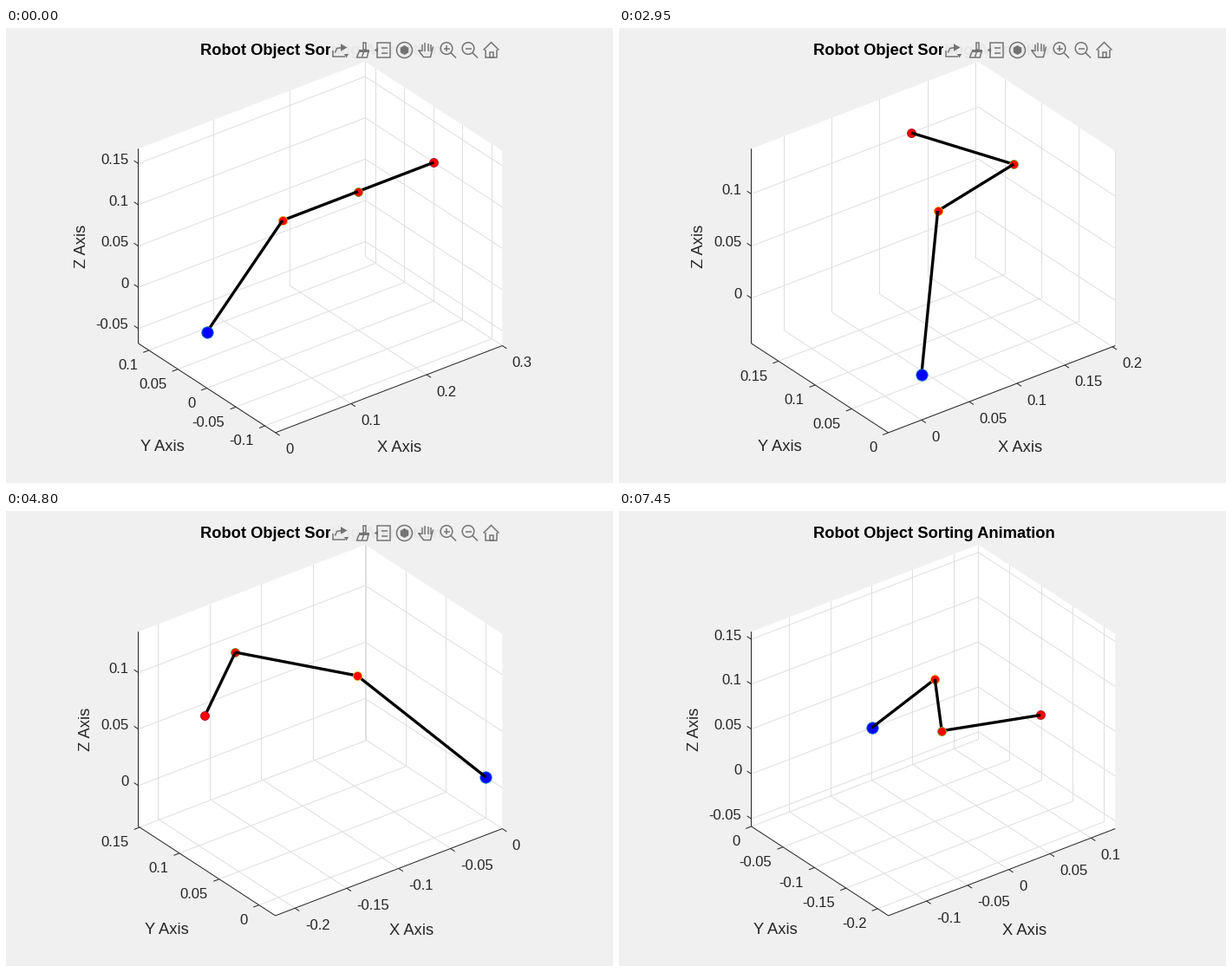
Write a matplotlib script that moves like this. It is 700 px wide and 525 px high and loops after 7500 ms.

```python
import numpy as np
import matplotlib.pyplot as plt
from matplotlib.animation import FuncAnimation
from matplotlib.collections import LineCollection
from matplotlib.patches import Circle, Polygon, Rectangle, RegularPolygon

W, H, DPI = 700, 525, 100
STEPS = 50
INK, GRAY, PAPER = "#262626", "#737373", "#f0f0f0"
plt.rcParams["font.family"] = "Liberation Sans"

# Orthographic view: azimuth -37.5, elevation 30
AZ, EL = np.radians(-37.5), np.radians(30)
UX = np.array([np.cos(AZ), np.sin(AZ) * np.sin(EL)])
UY = np.array([np.sin(AZ), -np.cos(AZ) * np.sin(EL)])
UZ = np.array([0, -np.cos(EL)])
VIEW = np.array([UX, UY, UZ])
TO_EYE = np.array([np.cos(EL) * np.sin(AZ), -np.cos(EL) * np.cos(AZ), np.sin(EL)])
CENTER = np.array([362.5, 252.9])
SIDE = 259.5
ASPECT = np.array([1.271, 1, 1])
TICK = 0.025 * SIDE * ASPECT[0]

# The base joint turns towards each drop point, the others fold the arm
START, PICK, DROP = [np.degrees(np.arctan2(y, x)) for x, y in [(1, 0), (3, 1), (-3, 1)]]
POSES = np.array([[START, 0, 0], [PICK, -31.3, 97.5], [DROP, -31.3, 97.5],
                  [-90, -33.7, 103.9]])

fig = plt.figure(figsize=(W / DPI, H / DPI), dpi=DPI, facecolor=PAPER)
ax = fig.add_axes([0, 0, 1, 1])
ax.set_xlim(0, W)
ax.set_ylim(H, 0)
ax.axis("off")


def px(width):
    return width * 72 / DPI


def project(p, mid=0, scale=SIDE):
    return CENTER + (np.asarray(p) - mid) * scale @ VIEW


def crisp(line):
    """Put vertical lines on whole pixel columns."""
    line = np.array(line)
    if np.ptp(line[:, 0]) < 0.01:
        line[:, 0] = np.floor(line[:, 0]) + 0.5
    return line


def arm(n):
    seg, k = divmod(n, STEPS)
    q = POSES[seg] + (POSES[seg + 1] - POSES[seg]) * k / (STEPS - 1)
    turn = np.radians(np.cumsum(q))
    links = 0.1 * np.column_stack([np.cos(turn), np.sin(turn), [1, 0, 0]])
    return np.vstack([np.zeros(3), np.cumsum(links, axis=0)])


def ticks(lo, hi):
    step = 0.1 if hi - lo > 0.285 else 0.05
    return step * np.arange(np.ceil(lo / step - 1e-6), np.floor(hi / step + 1e-6) + 1)


def label(v):
    return f"{round(v, 2) + 0:g}"


def text_width(s):
    em = {".": 0.278, "-": 0.333}
    return 16.67 * sum(em.get(c, 0.556) for c in s)


def write(x, y, s, size=18.33, **kw):
    kw = {"color": INK, "va": "baseline", "ha": "center", "zorder": 3, **kw}
    return ax.text(x, y, s, fontsize=px(size), **kw)


def lines(color, width, z):
    return ax.add_collection(LineCollection([], colors=color, linewidths=px(width),
                                            snap=False, zorder=z))


# Axes box
left, front, right, right_top, back_top, left_top = [
    project(np.array(c) * ASPECT / 2) for c in
    [(-1, 1, -1), (-1, -1, -1), (1, -1, -1), (1, -1, 1), (1, 1, 1), (-1, 1, 1)]]
ax.add_patch(Polygon([left, front, right, right_top, back_top, left_top],
                     fc="white", ec="none", zorder=0))
lines(INK, 1, 2).set_segments([crisp(e) for e in
                               [(left_top, left), (left, front), (front, right)]])
write(363, 31, "Robot Object Sorting Animation", color="black", weight="bold")

# Parts updated in place
grid, marks = lines("#dfdfdf", 1, 1), lines(INK, 1, 2)
x_name = write(0, 489, "X Axis")
y_name = write(0, 488, "Y Axis")
z_name = write(0, 252, "Z Axis", rotation=90, rotation_mode="anchor")
tick_text = [write(0, 0, "", size=16.67) for _ in range(24)]
links = [ax.plot([], [], color="black", lw=px(3.33), solid_capstyle="butt")[0]
         for _ in range(3)]
joints = [ax.plot([], [], "o", ms=px(10 if i else 13.3), mfc="red" if i else "blue",
                  mec=c, mew=px(0.85))[0]
          for i, c in enumerate(["#0072bd", "#edb120", "#77ac30", "#a2142f"])]

# Toolbar: eight line icons at an even pitch
shade = ax.add_patch(Rectangle((373.5, 13), 199, 24, fc=PAPER, ec="none", zorder=20))
toolbar = []


def show(patch, fill=False):
    patch.set(facecolor=GRAY if fill else "none", edgecolor=GRAY,
              linewidth=0 if fill else px(1.5), zorder=21)
    toolbar.append(ax.add_patch(patch))


def box(x, y, w, h):
    show(Rectangle((x - w / 2, y - h / 2), w, h))


def stroke(*pts):
    show(Polygon(pts, closed=False))


def dash(x, y, w=7):
    stroke((x - w / 2, y), (x + w / 2, y))


def triangle(x, y, r, turn):
    show(RegularPolygon((x, y), 3, radius=r, orientation=turn), fill=True)


def magnifier(x, y):
    show(Circle((x - 1.5, y - 2), 6.8))
    stroke((x + 3.5, y + 3), (x + 9.5, y + 9))
    dash(x - 1.5, y - 2)


def build_toolbar(y=25.5):
    share, brush, tip, cube, hand, zoom_in, zoom_out, home = 384.5 + 25 * np.arange(8)

    stroke((share - 8, y), (share - 8, y + 7), (share + 6, y + 7))
    stroke((share - 5, y + 3), (share - 3, y - 2), (share + 3, y - 3))
    triangle(share + 4, y - 3, 5, -np.pi / 2)
    triangle(share + 8, y + 6, 3, 0)

    box(brush + 4, y - 5, 3, 8)
    show(Rectangle((brush - 3, y - 1), 12, 3), fill=True)
    for dx in (-6, 0, 6):
        stroke((brush + 3 + dx * 0.9, y + 2), (brush + 1 + dx, y + 8))
    dash(brush + 1, y + 8, 13)

    box(tip + 1, y, 15, 17)
    for dy in (-3, 3):
        dash(tip + 2, y + dy)
    triangle(tip - 7, y, 3, np.pi / 2)

    show(Circle((cube, y), 9))
    show(RegularPolygon((cube, y), 6, radius=5.5), fill=True)

    fingers = hand + np.array([-5, -1.5, 2, 5.5])
    for x, top in zip(fingers, 9 - np.abs(fingers - hand) / 2):
        stroke((x, y + 1), (x, y - top))
    stroke((hand - 5, y + 1), (hand - 9, y), (hand - 3, y + 8),
           (hand + 5, y + 8), (hand + 8, y - 4))

    for x in (zoom_in, zoom_out):
        magnifier(x, y)
    stroke((zoom_in - 1.5, y - 5.5), (zoom_in - 1.5, y + 1.5))

    stroke((home - 9, y), (home, y - 9), (home + 9, y))
    stroke(*[(home + sx * 6.5, y + dy) for sx, dy in [(-1, -1), (-1, 8), (1, 8), (1, -1)]])
    box(home, y + 5, 4, 6)


build_toolbar()

# Per axis: order in which grid lines cross the floor and walls,
# tick direction, label offset and alignment
RULES = [((1, 2), -UY, (11.5, 24.5), "left"),
         ((0, 2), -UX, (-12.8, 22.3), "right"),
         ((0, 1), UY, (-11.5, 0.5), "right")]


def place_ticks(lo, hi, mid, scale):
    grid_lines, mark_lines, labels, widest = [], [], [], []
    for axis, (order, out, offset, ha) in enumerate(RULES):
        values = ticks(lo[axis], hi[axis])
        for v in values:
            p = lo.copy()
            if axis == 2:
                p[1] = hi[1]
            p[axis] = v
            path = [project(p, mid, scale)]
            for k in order:
                p[k] = lo[k] + hi[k] - p[k]
                path.append(project(p, mid, scale))
            grid_lines += [crisp(path[:2]), crisp(path[1:])]
            mark_lines.append([path[0], path[0] + TICK * out])
            labels.append((path[0] + offset, label(v), ha))
        widest.append(max(text_width(label(v)) for v in values))

    grid.set_segments(grid_lines)
    marks.set_segments(mark_lines)
    for t in tick_text:
        t.set_visible(False)
    for t, (at, s, ha) in zip(tick_text, labels):
        t.set(position=at, text=s, ha=ha, visible=True)

    # Axis names keep clear of the widest tick label
    x_name.set_x(430 + widest[0])
    y_name.set_x(218 - widest[1])
    z_name.set_x(129.5 - widest[2])


def update(n):
    pts = arm(n)
    low, high = pts.min(axis=0), pts.max(axis=0)
    mid = (low + high) / 2
    # Equal axes: the tightest box of fixed shape around the arm
    size = np.max((high - low) / ASPECT)
    scale = SIDE / size
    half = size * ASPECT / 2
    place_ticks(mid - half, mid + half, mid, scale)

    flat = project(pts, mid, scale)
    depth = pts @ TO_EYE
    for i, joint in enumerate(joints):
        joint.set_data(flat[i:i + 1].T)
        joint.set_zorder(10 + depth[i])
    for i, link in enumerate(links):
        link.set_data(flat[i:i + 2].T)
        link.set_zorder(10 + depth[i:i + 2].mean())

    # The toolbar fades out just before the end
    fade = float(np.clip((145.5 - n) / 3, 0, 1))
    shade.set_alpha(0.97 * fade)
    for part in toolbar:
        part.set_alpha(fade)
    return []


anim = FuncAnimation(fig, update, frames=3 * STEPS, interval=50, repeat=True,
                     repeat_delay=0, blit=False)
plt.show()
```
